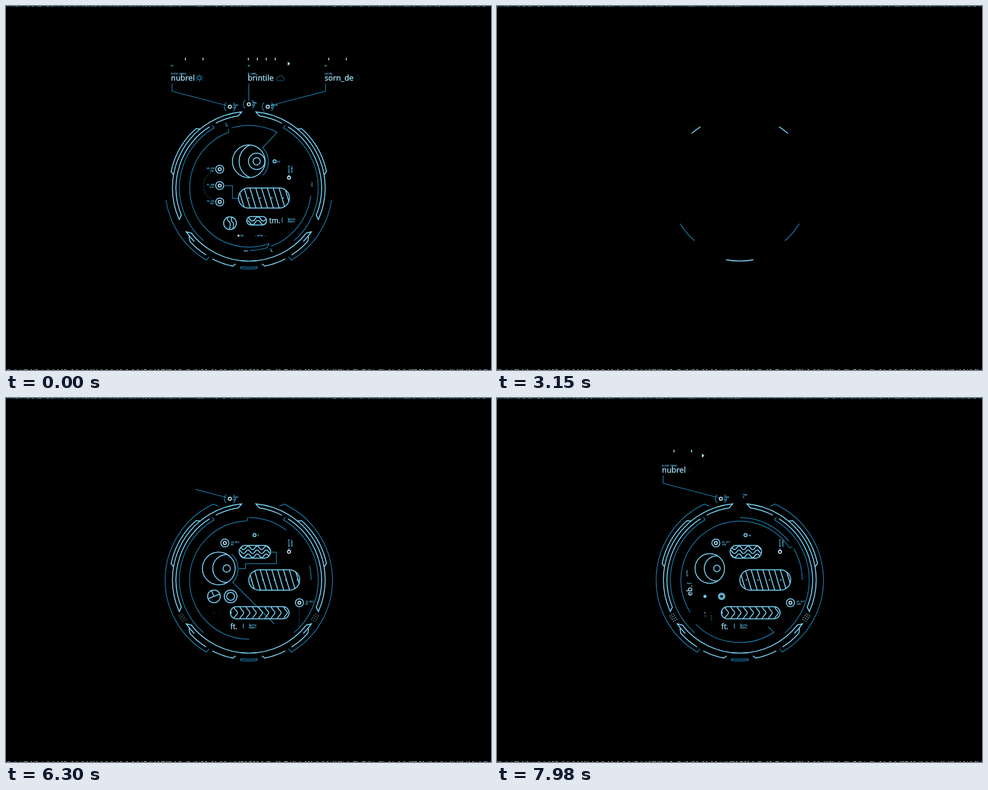
Recreate the animation shown at these times as an HTML page. Size 800 px wide and 600 px high, loop 8000 ms.

```html
<!DOCTYPE html>
<html lang="en">
<head>
<meta charset="utf-8">
<title>Round interface</title>
<style>
  html, body { margin: 0; width: 100%; height: 100%; overflow: hidden; background: #000; }
  svg { display: block; width: 800px; height: 600px; }
  path, circle, rect { fill: none; vector-effect: non-scaling-stroke; }
  .b { stroke: #7adaff; stroke-width: 1.5; }
  .d { stroke: #1a7cab; stroke-width: 1.25; }
  .w { stroke: #c9f1ff; stroke-width: 1.5; }
  .dots { stroke: #1a7cab; stroke-width: 1.2; stroke-dasharray: 1.2 2.4; }
  .f { fill: #a9e6ff; }
  text { white-space: pre; font-family: "Noto Sans", sans-serif; }
  .name { fill: #a9e6ff; stroke: #a9e6ff; stroke-width: .25; }
  .tiny { fill: #58bfe9; font-family: "Noto Sans Mono", monospace; font-weight: 700; }
</style>
</head>
<body>
<svg id="stage" viewBox="0 0 800 600"></svg>
<script>
const LOOP = 8000, SPLIT = 2400, CX = 400.5, CY = 300;
const stage = document.getElementById('stage');
const updates = [];
const every = fn => updates.push(fn);

function add(parent, tag, attrs = {}) {
  const e = document.createElementNS('http://www.w3.org/2000/svg', tag);
  for (const k in attrs) e.setAttribute(k, attrs[k]);
  return parent.appendChild(e);
}
const clamp = x => Math.max(0, Math.min(1, x));
const mix = (a, b, p) => a + (b - a) * p;
const ease = x => x < .5 ? 4 * x ** 3 : 1 - 4 * (1 - x) ** 3;
const linear = (t, [start, dur]) => clamp((t - start) / dur);
const prog = (t, step) => ease(linear(t, step));

// A life says when a part leaves the first scene (out), enters the second (in) and leaves it (end).
const gone = (start, dur = 800) => ({ out: [start, dur] });
const born = (start, dur = 650, end) => ({ in: [start, dur], end });
const both = (out, outDur, start, dur) => ({ out: [out, outDur], in: [start, dur] });

// visible part [a, b] of 0..1 at time t
function span(t, life, f = prog) {
  if (t < SPLIT) return [life.out ? f(t, life.out) : 1, 1];
  return [life.end ? f(t, life.end) : 0, life.in ? f(t, life.in) : 0];
}
function amount(t, life) {
  const [a, b] = span(t, life);
  return Math.max(0, b - a);
}

// polar point, degrees clockwise from the top
function pt(r, deg) {
  const a = deg * Math.PI / 180;
  return (CX + r * Math.sin(a)).toFixed(2) + ' ' + (CY - r * Math.cos(a)).toFixed(2);
}
const arc = (r, from, to) =>
  `${pt(r, from)}A${r} ${r} 0 ${+(Math.abs(to - from) > 180)} ${+(to > from)} ${pt(r, to)}`;

function line(parent, cls, d, life) {
  const e = add(parent, 'path', { class: cls, d, pathLength: 1 });
  every(t => {
    const [a, b] = span(t, life);
    e.style.display = b - a < .002 ? 'none' : '';
    e.setAttribute('stroke-dasharray', `${b - a} 2`);
    e.setAttribute('stroke-dashoffset', -a);
  });
}
function fade(e, life) {
  every(t => e.setAttribute('opacity', amount(t, life)));
  return e;
}
function grow(x, y, life) {
  const g = add(stage, 'g');
  every(t => {
    const s = amount(t, life);
    g.style.display = s < .01 ? 'none' : '';
    g.setAttribute('transform', `translate(${x} ${y}) scale(${s})`);
  });
  return g;
}
const ring = (g, x, r, cls = 'b') => add(g, 'circle', { cx: x, r, class: cls });
const dot = (x, y, r, life) => fade(add(stage, 'circle', { class: 'f', cx: x, cy: y, r }), life);

const GLYPHS = 'aS7dk3xE9vT0n';
const glyph = t => GLYPHS[Math.floor(t / 70) * 5 % GLYPHS.length];

// text that loses letters from the left and is typed in again
function word(x, y, s, size, life, cls = 'name', rot = 0) {
  const e = add(stage, 'text', { 'font-size': size, class: cls, transform: `translate(${x} ${y}) rotate(${rot})` });
  const hid = add(e, 'tspan', { style: 'fill:none;stroke:none' }), vis = add(e, 'tspan');
  every(t => {
    const str = typeof s === 'function' ? s(t) : s;
    const [a, b] = span(t, life, linear).map(p => Math.floor(p * str.length));
    let left = str.slice(a, b);
    if (left && a > 0) left = glyph(t) + left.slice(1);
    else if (left && b < str.length) left = left.slice(0, -1) + glyph(t);
    hid.textContent = left ? str.slice(0, a) : '';
    vis.textContent = left;
  });
  return e;
}
const tiny = (x, y, s, life, rot = 0, size = 4) => word(x, y, s, size, life, 'tiny', rot);

function edges() {
  let seed = 7;
  const rnd = () => (seed = seed * 16807 % 2147483647) / 2147483647;
  const specks = (y, gap) => {
    let d = '';
    for (let x = 0; x < 800; x += 1 + rnd() * gap) d += `M${x | 0} ${y}h${1 + rnd() * 3 | 0}`;
    return d;
  };
  const row = (d, color) => add(stage, 'path', { d, style: `stroke:${color}` });
  row('M0 .5H800', '#06354e');
  row(specks(.5, 13), '#4c9abb');
  row(specks(599.5, 9), '#a9b7bd');
}

function frame() {
  const half = add(stage, 'g', { id: 'half' });
  line(half, 'b', `M${arc(120, -32.7, -112)}L${arc(126, -114.4, -5.3)}L${arc(120, -8.4, -27)}`, both(670, 1600, 2460, 3200));
  line(half, 'd', `M${arc(114.5, -139.4, -30)}L${pt(120, -30.2)}`, both(490, 1600, 2460, 2000));
  line(half, 'b', `M${arc(120.5, -180, -128)}L${arc(126, -125, -134.5)}`, both(1400, 900, 2460, 2000));
  line(half, 'd', `M${pt(132, -22.5)}L${arc(138, -25, -149.5)}L${pt(131, -150)}`, both(-1060, 2000, 3868, 1850));
  line(half, 'b', `M${pt(127, -129)}L${arc(131, -132, -147.5)}`, both(100, 1100, 3150, 1300));
  line(half, 'b', `M${arc(131.5, -152.7, -168.4)}L${pt(127, -170.2)}`, both(100, 1100, 3760, 1900));
  line(half, 'b', `M${pt(126, -39.5)}L${arc(131, -41.7, -78)}L${pt(126.5, -80)}`, both(200, 1100, 4480, 1150));

  const cluster = add(half, 'g', { transform: 'translate(291 362) rotate(-32)' });
  for (let i = 0; i < 12; i++)
    add(cluster, 'circle', { class: 'f', r: .8, cx: (i % 3 - 1) * 3.4, cy: ((i / 3 | 0) - 1.5) * 3.6 });
  every(t => cluster.setAttribute('opacity', t < 5500 ? 0 : Math.max(0, Math.sin((t - 5500) / 330))));

  add(stage, 'use', { href: '#half', transform: `translate(${2 * CX} 0) scale(-1 1)` });
  line(stage, 'd', `M${arc(130.5, 186, 174)}L${pt(133, 174)}L${arc(133.5, 175, 185)}L${pt(133, 186)}Z`, both(300, 700, 3290, 750));
}

// dim arc whose angles follow the time; nothing is drawn when empty
function sweep(r, angles, tail) {
  const e = add(stage, 'path', { class: 'd' });
  every(t => {
    const [a, b] = angles(t);
    e.setAttribute('d', b - a < .5 ? '' : 'M' + arc(r, a, b) + (tail && tail(t) ? 'L' + pt(103, b + 1) : ''));
  });
}
function innerRing() {
  const lead = t => -24 + (t - 5670) * .035;
  sweep(97.5, t => {
    const p = prog(t, [0, 2300]);
    if (t < SPLIT) return [mix(-200, -75, p), mix(-20, -75, p)];
    return [lead(t) - 180 * prog(t, [4820, 1700]), lead(t)];
  }, t => t < 700 || t > 6300);
  sweep(103, t => t < SPLIT ? [0, 0] : [0, (37 + 17 * Math.cos((t - 5670) / 401)) * prog(t, [4900, 750])]);
  sweep(103, t => t < SPLIT ? [mix(97, 159, prog(t, [0, 1000])), 159] : [mix(90, lead(t) + 3, prog(t, [6000, 900])), 90]);

  line(stage, 'd', `M${arc(103, -16, 27)}L423.5 233.5A33 33 0 0 1 424 279`, gone(100, 1100));
  line(stage, 'd', `M373 258A33 33 0 0 1 374 304L${arc(103, 147, 225)}`, born(4500, 3650, [7000, 1960]));
  line(stage, 'd', `M${arc(103, 179, 163)}L${pt(98, 160)}`, gone(100));
  const marks = [[361, 193, 'FSP', 70], [435, 400, 'LMF', 70], [399, 402, 'PMF', 180], [503, 291, 'FST', 90]];
  for (const [x, y, s, rot] of marks) tiny(x, y, s, gone(250), rot);
  tiny(441, 203, 'TRH', born(6500, 300, [7000, 400]), -68);
  tiny(357, 404, 'LMF', born(6500, 300, [7000, 400]), -68);
}

let clips = 0;
function clipped(g, tag, shape) {
  const id = 'clip' + clips++;
  add(add(g, 'clipPath', { id }), tag, shape);
  return add(g, 'g', { 'clip-path': `url(#${id})` });
}
function pill(x, y, w, h, life, fill) {
  const g = grow(x, y, life);
  const box = { x: -w / 2, y: -h / 2, width: w, height: h, rx: h / 2 };
  fill(clipped(g, 'rect', box), w, h);
  add(g, 'rect', { ...box, class: 'b' });
}
function stripes(g, w, h) {
  for (let x = -w / 2 - 10; x < w / 2; x += 9.6) add(g, 'path', { class: 'b', d: `M${x} ${-h / 2}l10 ${h}` });
  const row = add(g, 'g');
  for (let i = -3; i < 4; i++) add(row, 'circle', { class: 'f', cx: i * 19, r: 1.1 });
  every(t => row.setAttribute('transform', `translate(${t * .004 % 19 - 6} 0)`));
}
const waves = (count, gap, amp, len) => (g, w) => {
  for (let i = 0; i < count; i++) {
    const y = (i - (count - 1) / 2) * gap;
    add(g, 'path', { class: 'b', d: `M${-w / 2 - 4} ${y}q${len / 4} ${-amp} ${len / 2} 0` + `t${len / 2} 0`.repeat(w / len * 2 + 2) });
  }
};
function chevrons(g, w, h) {
  for (let x = -w / 2 - 5; x < w / 2; x += 10.3)
    add(g, 'path', { class: 'b', d: `M${x} ${-h / 2}q1 3 5 7q3 3 0 6q-4 4 -5 7` });
}
function moon(x, y, r, slide, life) {
  const g = grow(x, y, life);
  const shade = ring(clipped(g, 'circle', { r: 27 }), 13, r);
  every(t => shade.setAttribute('cx', 13 - slide * t));
  ring(g, 0, 27);
  ring(g, 13, 6);
  return g;
}
function target(x, y, life) {
  const g = grow(x, y, life);
  ring(g, 0, 6.6);
  ring(g, 0, 2.5, 'w');
}
function sideLabel(y, dy, life) {
  tiny(465, y, 'BLOSM DE', life, 90, 4.2);
  tiny(469.5, y, 'JADSE', life, 90, 4.2);
  ring(grow(466.8, y + dy, life), 0, 2.5, 'w');
}
function tag(x, y, name, life) {
  word(x, y, name, 12, life);
  fade(add(stage, 'text', { x: x + 19, y: y - 3, 'font-size': 8.5, class: 'tiny' }), life).textContent = '( )';
  tiny(x + 33, y - 5.5, 'AZTW', life);
  tiny(x + 33, y - 1.5, 'ABYC.', life);
}

function sceneA() {
  ring(moon(400.5, 256, 29, .0015, gone(1350, 900)), 13, 13.5);
  ring(grow(443, 256, gone(300)), 0, 2.6);
  tiny(447.5, 257.5, 'K3', gone(300, 600));
  ['60,670', '91,300', '38,326'].forEach((s, i) => {
    const y = 269 + i * 27;
    target(352.5, y, gone(200 + i * 150));
    tiny(331, y - .5, s, gone(1000, 1000), 0, 3.6);
    tiny(336, y + 3.5, 52 + i * 11 + '%', gone(1000, 1000), 0, 3.6);
  });
  fade(add(stage, 'path', { class: 'dots', d: 'M341 273Q326 280 326 296T341 319' }), gone(300));
  line(stage, 'd', 'M360 296H373.5V317H384', gone(300, 1000));
  pill(425.5, 316.5, 84, 33, gone(1500, 750), stripes);
  sideLabel(263, 20, gone(300));
  pill(369.5, 358, 21, 21, gone(1000, 1300), g =>
    add(g, 'path', { class: 'b', d: 'M-3 -11Q-6 -5 -2 -3T-1 11M4 -11Q0 -5 4 -2T4 11' }));
  pill(413.5, 354, 33, 14, gone(1500), waves(2, 6, 7, 18));
  tag(434, 358, 'tm.', gone(1150));
  dot(383.5, 378.5, 1.8, gone(1500));
  tiny(387, 380, 'DE', gone(1500));
  tiny(410, 380, '• BTSF •', gone(1500));
}

function sceneB() {
  moon(351, 281, 23, 0, born(4900, 700, [7200, 2700]));
  const late = t => t > 7400;
  for (const [x, y] of [[361, 239], [484, 337.5]]) {
    target(x, y, born(5000));
    tiny(x + 10, y - .5, t => late(t) ? '41,977' : '34,012', born(5400), 0, 3.8);
    tiny(x + 10, y + 3.5, t => late(t) ? '56B' : 'DS', born(5400), 0, 3.8);
  }
  fade(add(stage, 'path', { class: 'dots', d: 'M484 346V377' }), born(5200, 400, [7300, 1300]));
  ring(grow(410, 226, born(5800)), 0, 2.6);
  tiny(414.5, 227.5, t => late(t) ? '96' : '42', born(5900));
  pill(410.5, 253.5, 52, 21, born(4950), waves(3, 6.5, 6, 15));
  line(stage, 'd', 'M437 254H446V273H395V281H384', born(4900, 1400, [7000, 700]));
  pill(442.5, 300, 84, 33.5, born(4900, 1050), stripes);
  pill(418.5, 354, 97, 20, born(4950), chevrons);

  const pie = grow(343, 327, born(4950, 650, [7200, 1200]));
  ring(pie, 0, 10.5);
  const cut = add(pie, 'path', { class: 'b', d: 'M0 -10.5V10.5M0 0H-10.5' });
  every(t => cut.setAttribute('transform', `rotate(${135 * prog(t, [5670, 1260])})`));
  const coin = grow(370.5, 327, born(4950, 650, [7180, 1600]));
  ring(coin, 0, 10.5);
  ring(coin, 0, 6.5);

  tag(370, 381, 'ft.', born(4950));
  sideLabel(233, 20.5, born(4950));
  dot(343, 354, 1.6, born(6100, 650, [7300, 1300]));
  fade(tiny(341.5, 357, 'DE', born(6100), 90), born(6100, 650, [7300, 1300]));
  fade(tiny(352, 353, '• BTSF •', born(6100), 90), born(6100, 650, [7300, 1300]));
  word(322, 326, 'eb.', 12, born(7300), 'name', -90);
  word(319, 308, '(', 8.5, born(7300), 'tiny', -90);
  tiny(315, 294, 'AZTW', born(7300), -90);
}

function sunPath() {
  let d = 'M3 0A3 3 0 1 1 -3 0A3 3 0 1 1 3 0';
  for (let a = 0; a < 6.2; a += Math.PI / 4) {
    const c = Math.cos(a), s = Math.sin(a);
    d += `M${c * 4.3} ${s * 4.3}L${c * 6.2} ${s * 6.2}`;
  }
  return d;
}

// three callouts leave one after another; only the first comes back
function callout(i, o) {
  const x = 272 + 126.7 * i, nx = CX + 31.3 * (i - 1), ny = i === 1 ? 162 : 166;
  const life = (out, dur, start, inDur) => i ? gone(out, dur) : both(out, dur, start, inDur);
  word(x, 123, o.name, 12.8, life(850 + 300 * i, 800, 7100, 500));
  tiny(x, 112.5, o.note, life(500 + 100 * i, 800, 6550, 750), 0, 3.8);
  tiny(x, 99.5, 'RT', { ...life(1800, 450, 6550, 300), end: [7200, 400] }, 0, 3.6);
  line(stage, 'd', o.path, life(250 + 300 * i, 1000, 5900, 800));

  const icon = add(add(stage, 'g'), 'path', { class: 'd', d: o.icon, transform: `translate(${o.iconX} 118.5)` });
  fade(icon.parentNode, life(800 + 600 * i, 300, 7700, 1000));
  every(t => icon.setAttribute('opacity', t < SPLIT ? clamp(1 - .4 * i + t / 500) : 1));

  const ticks = fade(add(stage, 'g'), life(950 + 450 * i, 350, 6350, 200));
  for (let k = 0; k < o.ticks; k++) add(ticks, 'path', { class: 'w', d: `M${k * o.gap} 85.5v4` });
  every(t => ticks.setAttribute('transform',
    `translate(${x + (o.phase + t / 1000 * o.gap * o.gap / 60) % o.gap} 0)`));
  const arrow = add(stage, 'path', { d: `M${x + 66} 91.5l4 3.5l-4 3.5z`, class: 'f' });
  every(t => arrow.style.display = t >= o.arrow[0] && t < o.arrow[1] ? '' : 'none');

  const node = life(600 + 430 * i, 700, 5250, 350);
  const g = grow(nx, ny, node);
  ring(g, 0, 2.6, 'w');
  const arms = add(g, 'path', { class: 'd', d: 'M-6 -7Q-12.5 0 -6 7M6 -7Q12.5 0 6 7' });
  every(t => arms.setAttribute('transform', `rotate(${t < SPLIT ? -30 * prog(t, [0, 1500]) : 0})`));
  const tip = i === 1 ? both(400, 800, 7850, 150) : life(400, 800, 5500, 300);
  tiny(nx + 5, ny - .8, o.tip, tip, 0, 3.8);
  tiny(nx + 5, ny + 3.2, 'BX', tip, 0, 3.8);
}

function callouts() {
  const disc = add(stage, 'circle', { cx: 369, cy: 166, style: 'stroke:#0e5b86' });
  every(t => {
    const outer = 24 * prog(t, [4800, 500]) - 4 * prog(t, [5300, 400]);
    const width = outer - 20 * prog(t, [5050, 1150]);
    disc.style.display = width < .1 || t > 6200 ? 'none' : '';
    disc.setAttribute('r', Math.max(0, outer - width / 2));
    disc.style.strokeWidth = Math.max(0, width);
  });
  callout(0, {
    name: 'nubrel', note: 'ELVCR_THBES', tip: 'FLOS', icon: sunPath(), iconX: 319,
    path: 'M364 164L274 140.5V128', ticks: 2, gap: 29, phase: 24, arrow: [7500, 8000]
  });
  callout(1, {
    name: 'brintile', note: 'M_CARD', tip: 'PEAL', iconX: 453,
    icon: 'M-4 4.5H4A3 3 0 0 0 4 -1.2A4.2 4.2 0 0 0 -3.6 -1.8A3.2 3.2 0 0 0 -4 4.5Z',
    path: 'M400.5 157V128', ticks: 4, gap: 14.8, phase: 1, arrow: [0, 1820]
  });
  callout(2, {
    name: 'sorn_de', note: 'LECTRL', tip: 'BRATE', iconX: 580,
    icon: 'M0 -5Q3 0 2.6 2A2.7 2.7 0 0 1 -2.6 2Q-3 0 0 -5Z',
    path: 'M436 164L527 140.5V128', ticks: 2, gap: 29, phase: 7, arrow: [350, 1260]
  });
}

edges();
frame();
innerRing();
sceneA();
sceneB();
callouts();

const start = performance.now();
function draw(now) {
  const t = Math.max(0, now - start) % LOOP;
  for (const update of updates) update(t);
  requestAnimationFrame(draw);
}
draw(start);
</script>
</body>
</html>
```
